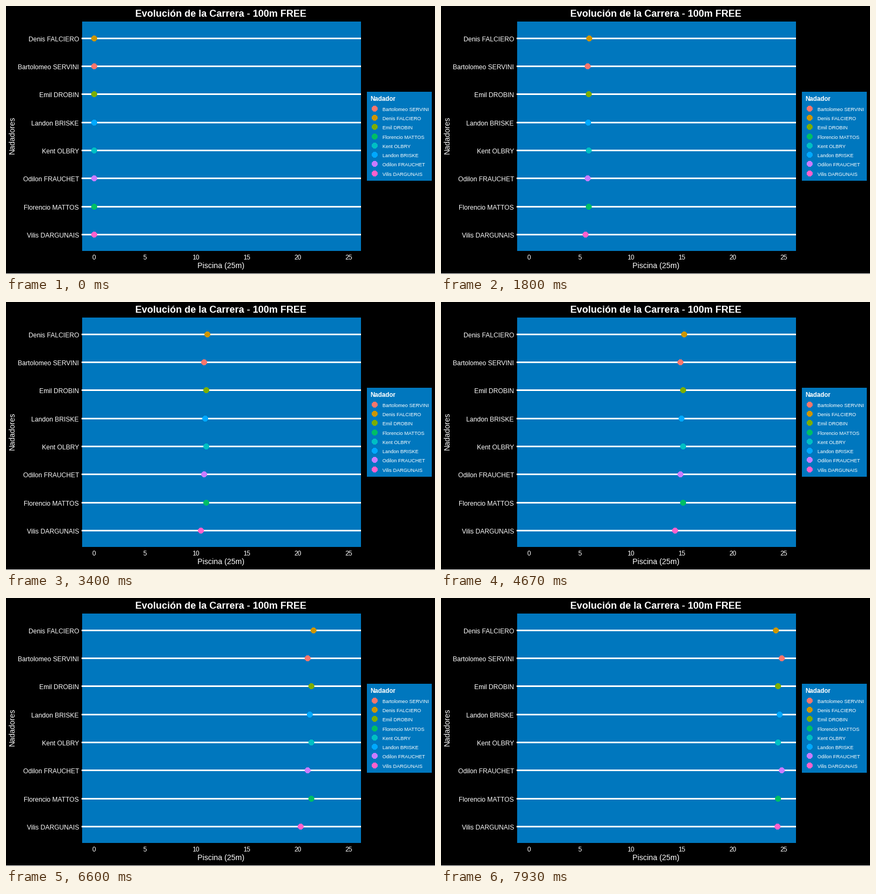
Write a matplotlib script that moves like this. It is 800 px wide and 500 px high and loops after 8 s.

```python
import math

import matplotlib.pyplot as plt
from matplotlib.animation import FuncAnimation
from matplotlib.patches import Circle, Rectangle

W, H, DPI = 800, 500, 100
FRAMES, LOOP_MS = 400, 8000   # 20 ms ticks, so steps land on 10 ms timing
WATER = "#0077BE"
START, POOL = 164, 474.92     # left wall and pool length in pixels
BACK_SPEED = 3.8              # pixels per step after the turn

# name, lane y, step of the turn, colour (in legend order)
SWIMMERS = [
    ("Bartolomeo SERVINI", 112, 118, "#F8766D"),
    ("Denis FALCIERO", 60, 115, "#CD9600"),
    ("Emil DROBIN", 164, 116, "#7CAE00"),
    ("Florencio MATTOS", 374, 116, "#00BE67"),
    ("Kent OLBRY", 269, 116, "#00BFC4"),
    ("Landon BRISKE", 217, 117, "#00A9FF"),
    ("Odilon FRAUCHET", 321, 118, "#C77CFF"),
    ("Vilis DARGUNAIS", 426, 122, "#FF61CC"),
]

plt.rcParams["font.family"] = "Liberation Sans"
fig = plt.figure(figsize=(W / DPI, H / DPI), dpi=DPI, facecolor="black")
ax = fig.add_axes([0, 0, 1, 1])
ax.set_xlim(0, W)
ax.set_ylim(H, 0)
ax.axis("off")


def box(x0, y0, x1, y1, color):
    ax.add_patch(Rectangle((x0, y0), x1 - x0, y1 - y0, facecolor=color,
                           linewidth=0, antialiased=False))


def text(x, y, s, px, ha="left", **kw):
    ax.text(x, y, s, fontsize=px * 72 / DPI, color="white", ha=ha,
            va="baseline", **kw)


def dot(x, y, color):
    # without smoothing every touched pixel is filled: 11 px across
    return ax.add_patch(Circle((x, y), 4.85, facecolor=color, linewidth=0,
                               antialiased=False, zorder=3))


def swim_x(step, turn):
    if step <= turn:
        dist = POOL * step / turn
    else:
        dist = POOL - BACK_SPEED * (step - turn)
    return round(START + dist) + 0.5


# Pool, titles and axes
box(142, 29, 662, 457, WATER)
box(0, 499, W, H, "white")
text(401, 20, "Evolución de la Carrera - 100m FREE", 18.2, "center",
     weight="bold")
text(401, 489, "Piscina (25m)", 14.2, "center")
text(16, 241, "Nadadores", 14.2, "center", rotation=90,
     rotation_mode="anchor")
for m in range(0, 26, 5):
    text(163.8 + m * POOL / 25, 473, str(m), 12, "center")

# Legend frame
box(673, 160, 794, 326, WATER)
text(679, 177, "Nadador", 11.6, weight="bold")

# Lanes, legend rows and swimmers
dots = []
for i, (name, y, turn, color) in enumerate(SWIMMERS):
    box(141, y - 1, 662, y + 2, "white")
    text(136, y + 6, name, 12.1, "right")
    key_y = math.floor(191.25 + 17.28 * i) + 0.5
    dot(687.5, key_y, color)
    text(702, key_y + 4.5, name, 9.3)
    dots.append(dot(START + 0.5, y + 0.5, color))


def update(frame):
    step = (3 * frame + 2) // 10   # 15 position steps per second
    for d, (_, y, turn, _) in zip(dots, SWIMMERS):
        d.center = (swim_x(step, turn), y + 0.5)
    return dots


anim = FuncAnimation(fig, update, frames=FRAMES, interval=LOOP_MS / FRAMES,
                     init_func=lambda: update(0), repeat=True,
                     repeat_delay=0, blit=False)
plt.show()
```
